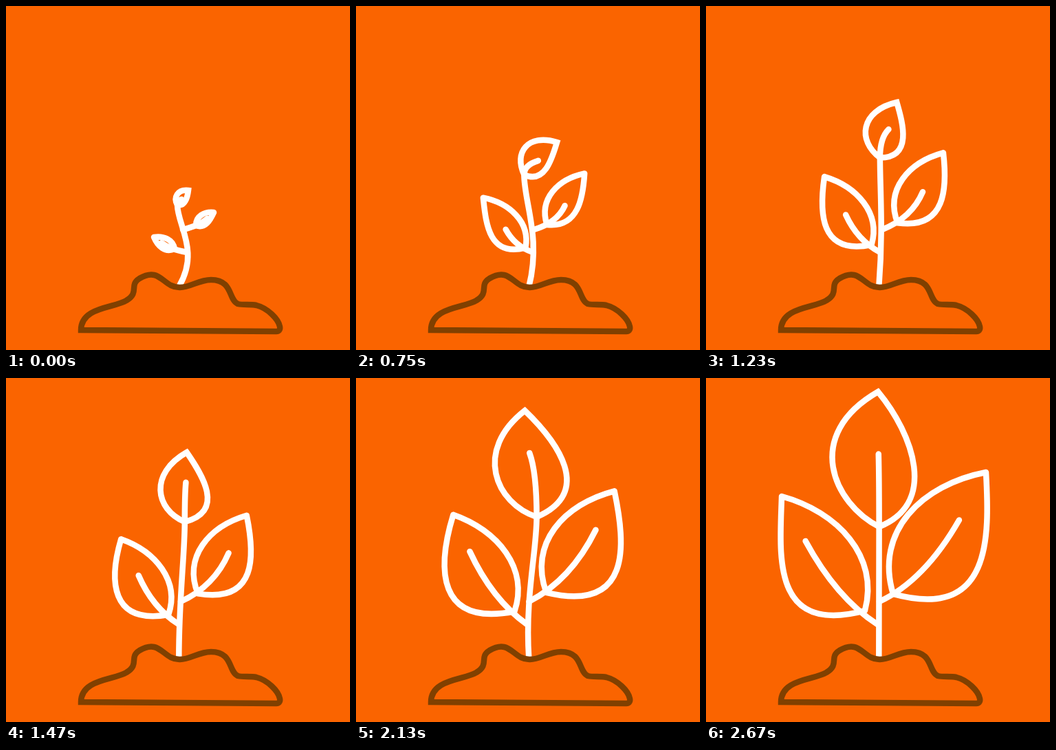
Write an HTML page with a canvas that moves like this. It is 500 px wide and 500 px high and loops after 2.73 s.

```html
<!DOCTYPE html>
<html lang="en">
<head>
<meta charset="utf-8">
<title>Growing plant</title>
<style>
html, body { margin: 0; width: 100%; height: 100%; overflow: hidden; background: #fa6400; }
canvas { display: block; width: 500px; height: 500px; }
</style>
</head>
<body>
<canvas id="stage" width="500" height="500"></canvas>
<script>
const ctx = document.getElementById('stage').getContext('2d');
const LOOP = 2730, STEP = 30, LAST = 89, STEPS_PER_POSE = 30;
const ROOT = { x: 251.3, y: 408 };

// Properties with four entries are keyed, one per pose.
// left / right: bulge of that side near the base and near the tip, relative to the leaf's length.
// vein: how far the vein reaches along the leaf.
const topLeaf = {
  base: [[249, 289], [243.4, 236.3], [269.3, 193.4], [251, 217]],
  tip: [[265, 268], [297.5, 184], [242.5, 64], [250.3, 18.5]],
  left: [[.41, .53], [.51, .6], [.39, .49], [.33, .57]],
  right: [[.4, .19], [.48, .17], [.64, .27], [.43, .26]],
  vein: [.38, .44, .64, .535],
  near: .17, join: 'miter'
};
const sideVein = [.6, .37, .655, .645];
const leftLeaf = {
  base: [[245, 353], [246.7, 351], [230, 340], [231, 338]],
  tip: [[215, 336], [178.8, 267.2], [160.5, 215], [108.3, 170.5]],
  left: [[.36, .25], [.56, .21], [.64, .45], [.65, .24]],
  right: Array(4).fill([.31, .255]),
  vein: sideVein, nodeX: [263, 256, 248, 249], nodeY: 358,
  near: .25, join: 'round', bend: 1
};
const rightLeaf = {
  base: [[276, 319], [277.8, 317.7], [279.5, 310.8], [271.7, 314]],
  tip: [[302, 300], [338.2, 232.1], [356.5, 181], [408.7, 135.5]],
  left: Array(4).fill([.345, .285]),
  right: [[.38, .18], [.44, .21], [.7, .36], [.62, .27]],
  vein: sideVein, nodeX: [257, 259, 251, 252], nodeY: 325,
  near: .25, join: 'round', bend: -1
};
const stemLean = [282, 267, 242, 251.3];

const ground = new Path2D(
  'M109,471 C109,437 158,439 175,428 C195,416 178,406 194,396 ' +
  'C225,378 228,410 253,409 C268,409 280,398 298,398 C330,398 323,427 337,433 ' +
  'C345,435 355,433 364,435 C380,439 396,455 398,466 C399,471 396,473 393,473 Z');

const mix = (a, b, t) => Array.isArray(a) ? a.map((v, i) => mix(v, b[i], t)) : a + (b - a) * t;

function keyed(keys, time) {
  const i = Math.min(keys.length - 2, Math.floor(time));
  return mix(keys[i], keys[i + 1], time - i);
}

// Returns a function that places points along the leaf's axis and out to its left.
function axis(leaf, time) {
  const [x, y] = keyed(leaf.base, time), [tipX, tipY] = keyed(leaf.tip, time);
  const dx = tipX - x, dy = tipY - y;
  return (along, out) => [x + dx * along + dy * out, y + dy * along - dx * out];
}

function drawLeaf(leaf, time) {
  const at = axis(leaf, time), far = .68;
  const [leftNear, leftFar] = keyed(leaf.left, time);
  const [rightNear, rightFar] = keyed(leaf.right, time);
  ctx.beginPath();
  ctx.moveTo(...at(0, 0));
  ctx.bezierCurveTo(...at(leaf.near, leftNear), ...at(far, leftFar), ...at(1, 0));
  ctx.bezierCurveTo(...at(far, -rightFar), ...at(leaf.near, -rightNear), ...at(0, 0));
  ctx.closePath();
  ctx.lineJoin = leaf.join;
  ctx.stroke();
}

function drawSideVein(leaf, time) {
  const at = axis(leaf, time), reach = keyed(leaf.vein, time);
  ctx.beginPath();
  ctx.moveTo(keyed(leaf.nodeX, time), leaf.nodeY);
  ctx.quadraticCurveTo(...at(reach * .3, .11 * leaf.bend), ...at(reach, .05 * leaf.bend));
  ctx.stroke();
}

// The stem runs on into the top leaf as its vein and is upright where they meet.
function drawStem(time) {
  const at = axis(topLeaf, time);
  const [x, y] = at(0, 0), [endX, endY] = at(keyed(topLeaf.vein, time), 0);
  ctx.beginPath();
  ctx.moveTo(endX, endY);
  ctx.quadraticCurveTo(x, mix(endY, y, .3), x, y);
  ctx.bezierCurveTo(x, mix(y, ROOT.y, .25), keyed(stemLean, time), mix(y, ROOT.y, .56), ROOT.x, ROOT.y);
  ctx.stroke();
}

function draw(ms) {
  const time = Math.min(LAST, Math.floor((ms % LOOP) / STEP)) / STEPS_PER_POSE;
  ctx.fillStyle = '#fa6400';
  ctx.fillRect(0, 0, 500, 500);
  ctx.lineWidth = 8.5;
  ctx.lineCap = 'round';
  ctx.strokeStyle = '#fff';
  drawStem(time);
  for (const leaf of [leftLeaf, rightLeaf]) drawSideVein(leaf, time);
  for (const leaf of [leftLeaf, rightLeaf, topLeaf]) drawLeaf(leaf, time);
  ctx.strokeStyle = '#804000';
  ctx.lineJoin = 'miter';
  ctx.stroke(ground);
}

const start = performance.now();
function tick() {
  draw(performance.now() - start);
  requestAnimationFrame(tick);
}
tick();
</script>
</body>
</html>
```
